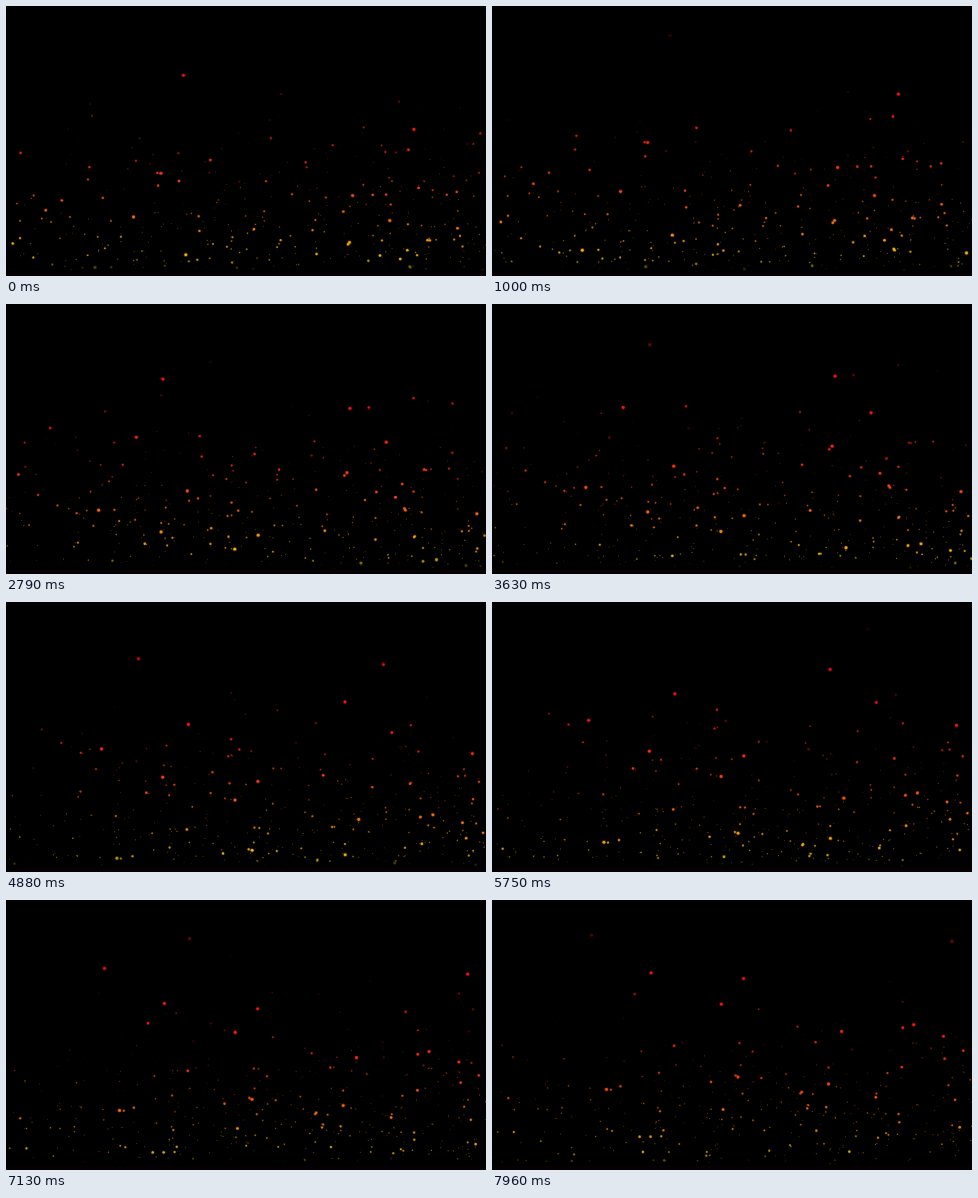
An HTML page with a canvas that plays this animation: 480 px wide and 270 px high, repeating every 8000 ms.

```html
<!DOCTYPE html>
<html lang="en">
<head>
<meta charset="utf-8">
<title>Rising embers</title>
<style>
  html, body { margin: 0; width: 100%; height: 100%; overflow: hidden; background: #000; }
  canvas { display: block; width: 480px; height: 270px; }
</style>
</head>
<body>
<canvas id="stage" width="480" height="270"></canvas>
<script>
const WIDTH = 480, HEIGHT = 270, LOOP = 8, FPS = 24;
const ctx = document.getElementById('stage').getContext('2d');
const clamp = v => Math.max(0, Math.min(1, v));

let seed = 71;
function random() {
  seed = (seed * 16807) % 2147483647;
  return seed / 2147483647;
}

// Every ember leans slightly towards the middle of the stage.
const lean = x => (240 - x) / 110;

// Leading embers: the second each one passes y = 200, and its x there.
const leaders = [
  [-4.1, 175], [-2.6, 412], [-1.2, 154], [-.4, 347], [.45, 128], [.6, 383],
  [1.6, 342], [2.25, 181], [3, 93], [3.15, 470], [3.95, 156], [4.1, 252],
  [4.8, 229], [5.4, 426], [5.6, 352], [7.1, 246], [7.35, 337], [7.55, 114]
].map(([pass, x]) => ({ pass, x, drift: lean(x), size: 1.6, end: 5.3, glow: 1 }));

const sparks = Array.from({ length: 1150 }, () => {
  const strength = random() ** 3.5;
  const x = WIDTH * random() ** .8;
  return {
    x,
    pass: -4.6 + random() * 15.8,
    drift: lean(x) + random() - .5,
    size: .5 + .9 * strength,
    end: .4 + 2.9 * random() + 1.6 * strength,
    glow: .4 + .6 * strength
  };
});

function dot(x, y, radius, alpha) {
  ctx.globalAlpha = alpha;
  ctx.beginPath();
  ctx.arc(x, y, radius, 0, 2 * Math.PI);
  ctx.fill();
}

// Embers accelerate upwards, cooling from yellow to red.
function drawEmber({ pass, x, drift, size, end, glow }, time) {
  const age = time - pass;
  if (age < -3.2 || age > end) return;
  const y = 200 - 25.3 * age - 1.6 * age * age;
  const px = x + drift * age;
  const alpha = glow * clamp((age + 3.2) / .8) * clamp((end - age) / 1.2);
  const hue = 48 * (Math.max(0, y) / 255) ** 3.6;
  ctx.fillStyle = `hsl(${hue} 100% 53%)`;
  dot(px, y, size * 1.4, alpha * .25);
  dot(px, y, size * .9, alpha * .95);
}

function drawFrame(time) {
  ctx.globalAlpha = 1;
  ctx.fillStyle = '#000';
  ctx.fillRect(0, 0, WIDTH, HEIGHT);
  ctx.fillStyle = '#050002';
  ctx.fillRect(0, HEIGHT - 4, WIDTH, 4);
  for (const ember of [...sparks, ...leaders]) drawEmber(ember, time);
}

const start = performance.now();
function tick() {
  const seconds = (performance.now() - start) / 1000 % LOOP;
  drawFrame(Math.floor(seconds * FPS) / FPS);
  requestAnimationFrame(tick);
}
tick();
</script>
</body>
</html>
```
